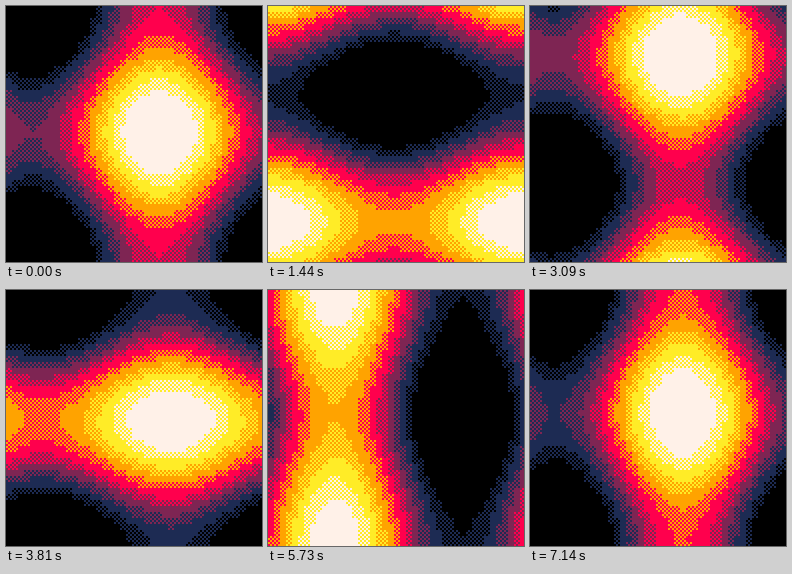
These frames come from a looping animation (256x256 px, 7170 ms). An HTML page with a canvas:

```html
<!DOCTYPE html>
<html lang="en">
<head>
<meta charset="utf-8">
<title>Plasma</title>
<style>
  html, body { margin: 0; width: 100%; height: 100%; overflow: hidden; background: #000; }
  canvas { display: block; width: 100vw; height: 100vh; image-rendering: pixelated; }
</style>
</head>
<body>
<canvas id="stage" width="128" height="128"></canvas>
<script>
const SIZE = 128, BLOCK = 3, STEP = 30, LOOP = 7170, CYCLE = 120;
const TAU = Math.PI * 2;
const ctx = document.getElementById('stage').getContext('2d');
const image = ctx.createImageData(SIZE, SIZE);
const palette = ['000000', '1d2b53', '7e2553', 'ff004d', 'ffa300', 'ffec27', 'fff1e8']
  .map(hex => [0, 2, 4].map(i => parseInt(hex.slice(i, i + 2), 16)));

// A slow wave going forwards plus a weaker one going back twice as fast,
// sampled once per block.
function wave(turn, slow, fast) {
  return Array.from({ length: SIZE }, (_, i) => {
    const p = (Math.floor(i / BLOCK) + 0.5) * BLOCK / SIZE;
    return 2 * Math.cos(TAU * (p - turn - slow / 360)) +
           Math.cos(TAU * (p + 2 * turn - fast / 360));
  });
}

function draw(turn) {
  const across = wave(turn, 239, 165);
  const down = wave(turn, 148.5, 254.5);
  let k = 0;
  for (let y = 0; y < SIZE; y++) {
    for (let x = 0; x < SIZE; x++) {
      const checker = ((x + y + 1) & 1) / 2;
      const level = Math.floor(2.5 + across[x] + down[y] + checker);
      const rgb = palette[Math.max(0, Math.min(6, level))];
      image.data[k++] = rgb[0];
      image.data[k++] = rgb[1];
      image.data[k++] = rgb[2];
      image.data[k++] = 255;
    }
  }
  ctx.putImageData(image, 0, 0);
}

let shown = -1;
function tick() {
  const frame = Math.floor((performance.now() % LOOP) / STEP);
  if (frame !== shown) {
    shown = frame;
    draw((frame % CYCLE) / CYCLE);
  }
  requestAnimationFrame(tick);
}
tick();
</script>
</body>
</html>
```
